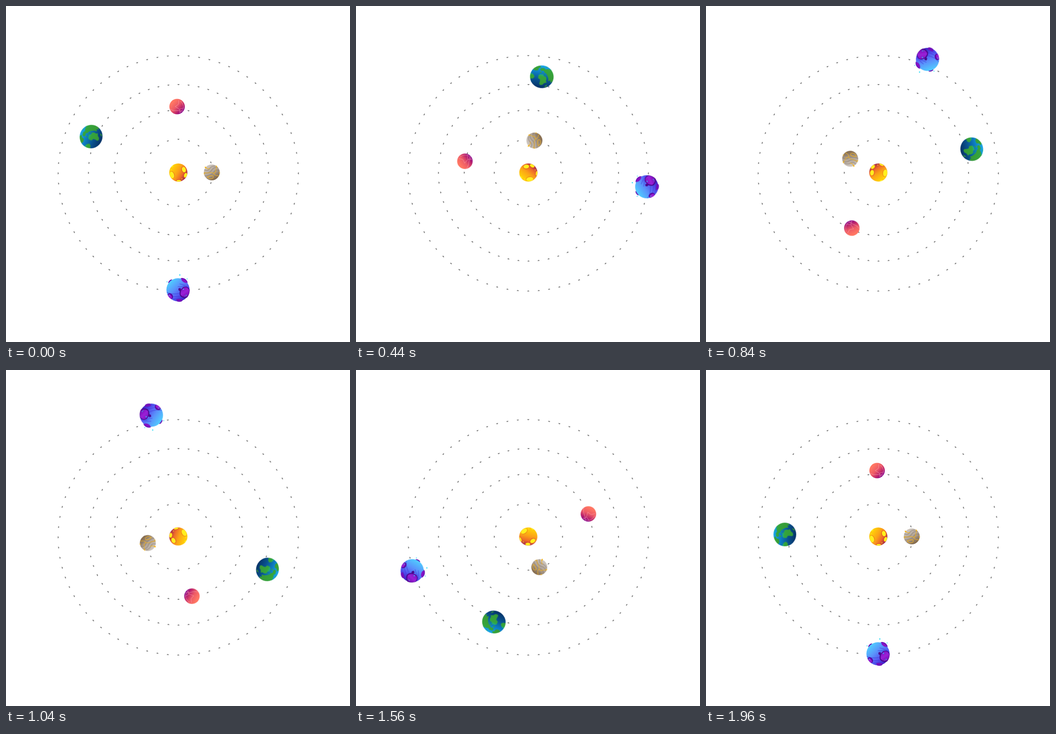
Write an HTML page that moves like this. It is 756 by 740 pixels and loops after 2000 ms.

```html
<!DOCTYPE html>
<html lang="en">
<head>
<meta charset="utf-8">
<title>Orbiting planets</title>
<style>
  html, body { margin: 0; width: 100%; height: 100%; overflow: hidden; background: #fff; }
  svg { display: block; width: 756px; height: 740px; }
  .orbit { animation: spin 2s infinite; transform-origin: var(--c); }
  /* 49 even steps of 40 ms, then a rest at the end pose */
  @keyframes spin {
    0% { transform: rotate(var(--from, 0deg)); animation-timing-function: steps(49); }
    97.99% { transform: rotate(var(--to, -361.5deg)); }
    98%, 100% { transform: rotate(var(--end, -360deg)); }
  }
  .sun { --c: 378.7px 366.7px; }
  .stone { --c: 381.2px 366.5px; }
  .coral { --c: 378px 361.5px; }
  .earth { --c: 381.3px 362.2px; --from: 21deg; --to: 361.6deg; --end: 360deg; }
  .violet { --c: 376px 359.2px; }
  .line { fill: none; stroke-linecap: round; stroke-linejoin: round; }
</style>
</head>
<body>
<svg viewBox="0 0 756 740">
  <defs>
    <linearGradient id="sunFill" x1=".1" y1=".25" x2=".95" y2=".75">
      <stop offset=".1" stop-color="#ffca0a"/><stop offset=".45" stop-color="#fba018"/>
      <stop offset=".72" stop-color="#ee6a2a"/><stop offset="1" stop-color="#98204c"/>
    </linearGradient>
    <linearGradient id="stoneFill" x1=".2" y1=".1" x2=".75" y2=".95">
      <stop offset="0" stop-color="#cfc8c2"/><stop offset=".5" stop-color="#b3a597"/>
      <stop offset="1" stop-color="#806443"/>
    </linearGradient>
    <linearGradient id="coralFill" x1=".15" y1=".15" x2=".9" y2=".85">
      <stop offset=".1" stop-color="#ff7663"/><stop offset=".45" stop-color="#ec5a66"/>
      <stop offset=".75" stop-color="#b8206c"/><stop offset="1" stop-color="#7c0496"/>
    </linearGradient>
    <linearGradient id="seaFill" x1=".22" y1=".02" x2=".68" y2=".98">
      <stop offset="0" stop-color="#22b4f4"/><stop offset=".35" stop-color="#0d80c6"/>
      <stop offset=".65" stop-color="#09528f"/><stop offset="1" stop-color="#042c60"/>
    </linearGradient>
    <linearGradient id="landFill" x1=".1" y1="0" x2=".6" y2="1">
      <stop offset="0" stop-color="#12b0a8"/><stop offset=".3" stop-color="#35a53c"/>
      <stop offset="1" stop-color="#379a35"/>
    </linearGradient>
    <linearGradient id="violetFill" x1=".12" y1=".12" x2=".85" y2=".9">
      <stop offset="0" stop-color="#4fd4ff"/><stop offset=".4" stop-color="#5a92fb"/>
      <stop offset=".68" stop-color="#5456f0"/><stop offset="1" stop-color="#3c14bc"/>
    </linearGradient>
    <linearGradient id="craterFill" x1=".2" y1="0" x2=".8" y2="1">
      <stop offset="0" stop-color="#7e12c4"/><stop offset=".5" stop-color="#9a20d6"/>
      <stop offset="1" stop-color="#7408b4"/>
    </linearGradient>
    <clipPath id="sunClip"><circle r="20"/></clipPath>
    <clipPath id="stoneClip"><circle r="17.5"/></clipPath>
    <clipPath id="coralClip"><circle r="17"/></clipPath>
    <clipPath id="violetClip"><circle r="25.5"/></clipPath>
    <clipPath id="earthClip"><ellipse rx="25" ry="26"/></clipPath>
  </defs>

  <g id="rings" fill="#808080"></g>

  <g class="orbit sun"><g transform="translate(378.7 366.7)">
    <circle r="20" fill="url(#sunFill)"/>
    <g clip-path="url(#sunClip)">
      <g fill="#d8442c" opacity=".75">
        <ellipse cx="-13.4" cy="5" rx="5.4" ry="8.3" transform="rotate(-18 -13.4 5)" opacity=".5"/>
        <ellipse cx="11.8" cy="-6.2" rx="5.2" ry="7" transform="rotate(-18 11.8 -6.2)"/>
        <ellipse cx="15.4" cy="6" rx="4" ry="6.3" transform="rotate(18 15.4 6)"/>
        <ellipse cx="1" cy="17.6" rx="6" ry="2.6"/>
      </g>
      <g fill="#fff01e">
        <ellipse cx="-14" cy="5.4" rx="4.6" ry="7.5" transform="rotate(-18 -14 5.4)"/>
        <ellipse cx="12.2" cy="-6.4" rx="4.3" ry="6.2" transform="rotate(-18 12.2 -6.4)"/>
        <ellipse cx="15.8" cy="6" rx="3.2" ry="5.3" transform="rotate(18 15.8 6)"/>
        <ellipse cx="1" cy="18.2" rx="5" ry="2"/>
        <ellipse cx="-13" cy="-13.6" rx="3" ry="1.3" transform="rotate(-45 -13 -13.6)"/>
        <circle cx="-16" cy="-6" r="1"/><circle cx="8" cy="14" r="1"/>
      </g>
    </g>
  </g></g>

  <g class="orbit stone"><g transform="translate(452.2 366.5)">
    <circle r="17.5" fill="url(#stoneFill)"/>
    <g class="line" clip-path="url(#stoneClip)">
      <g stroke="#85786c" stroke-width="2.6" opacity=".4">
        <path d="M-17 -6Q-9 -2 -5 -8T6 -14"/><path d="M-17 1Q-5 3 0 -5T15 -11"/>
        <path d="M-16 8Q-2 8 4 0T18 -4"/><path d="M-10 13Q5 12 10 5T18 3"/>
      </g>
      <g stroke="#eeb022" stroke-width="1.1">
        <path d="M-17 0Q-11 2 -6 .5T4 2L9 -2"/><path d="M-13 -11Q-9 -6 -4 -9M4 2L7 6L16 8"/>
        <path d="M-10 10Q-4 6 3 8Q5 13 -2 14Q-8 14 -10 10M9 -2Q8 -8 12 -13"/>
      </g>
    </g>
    <g fill="#f5b51d">
      <ellipse cx="-13.5" cy="-10.8" rx="2.4" ry="1.5" transform="rotate(40 -13.5 -10.8)"/>
      <circle cx="10" cy="-13.5" r="1.5"/><circle cx="17" cy="1" r="1.2"/><circle cx="-16.4" cy="3" r="1.2"/>
    </g>
  </g></g>

  <g class="orbit coral"><g transform="translate(376 221.5)">
    <circle r="17" fill="url(#coralFill)"/>
    <g class="line" clip-path="url(#coralClip)" stroke="#ffb0bd" stroke-width=".8" opacity=".75">
      <path d="M-17 5Q-9 10 0 9T16 12M-4 0L3 -5L4 -14M-4 0L5 6L7 14"/>
      <path d="M8 -12Q15 -4 14 3T5 13M5 6L14 3"/>
    </g>
  </g></g>

  <g class="orbit earth"><g transform="translate(173.2 362.2)">
    <g clip-path="url(#earthClip)"><g transform="rotate(-62.8)">
      <circle r="27" fill="url(#seaFill)"/>
      <g fill="url(#landFill)">
        <path d="M-12 -15L-7 -19L-2 -18L2 -22L8 -25L15 -23L22 -16L26 -5L23 0L20 -4L17 0L14 -5L10 -8L5 -11L0 -11L-4 -13L-8 -10L-12 -11Z"/>
        <path d="M-8 1L-6 -3L-1 -6L4 -4L8 -5L11 -2L13 3L16 4L12 9L11 14L7 17L4 16L2 10L0 7L-5 7Z"/>
        <path d="M-25 6L-18 6L-13 9L-14 14L-18 17L-20 24L-27 18Z"/>
        <path d="M-25 -11L-18 -18L-13 -17L-16 -12L-15 -7L-20 -3L-26 -3Z"/>
        <path d="M18 10L20 8L20 13L17 16ZM-8 -24L0 -26L-2 -23Z"/>
        <path d="M-9 -8L-6 -9L-6 -6L-9 -5ZM-2 -9L0 -9L1 -7L-1 -7ZM4 -9L7 -7L5 -6Z"/>
      </g>
    </g></g>
  </g></g>

  <g class="orbit violet"><g transform="translate(378 625)">
    <g fill="#6508b0">
      <ellipse cx="13" cy="-19.5" rx="9" ry="5" transform="rotate(34 13 -19.5)"/>
      <ellipse cx="3" cy="23" rx="7" ry="3.5"/>
      <ellipse cx="-17" cy="-18.5" rx="5.5" ry="2.5" transform="rotate(-42 -17 -18.5)"/>
    </g>
    <circle r="25.5" fill="url(#violetFill)"/>
    <g clip-path="url(#violetClip)">
      <g class="line" stroke="#3f36d8" stroke-width="1.6" opacity=".5">
        <path d="M-24 6Q-12 11 2 8"/><path d="M-20 12Q-8 17 5 14"/><path d="M-14 19Q-3 21 8 19"/>
        <path d="M4 -13Q14 -11 22 -6"/><path d="M0 -7Q8 -6 14 -8"/>
      </g>
      <ellipse cx="-17" cy="14" rx="5.5" ry="7" transform="rotate(-38 -17 14)" fill="#5808a4"/>
      <ellipse cx="-18" cy="15" rx="3.8" ry="5.4" transform="rotate(-38 -18 15)" fill="#9a1ed2"/>
    </g>
    <ellipse cx="13.4" cy="-19.8" rx="7" ry="3" transform="rotate(34 13.4 -19.8)" fill="#8412c4"/>
    <path d="M-4 21Q3 19 10 21L8 25Q3 27 -2 25Z" fill="#7210bc"/>
    <path d="M1 -3L5 -4L7 -1Q11 -8 18 -7Q24 -5 25.5 0Q26 10 20 17Q13 20 6 15Q2 10 4 3L1 1Z" fill="#4a0890"/>
    <path d="M8 0Q12 -6 18 -5.5Q24 -3 25 2Q25 11 19 15Q11 17 6 11Q5 5 8 0Z" fill="url(#craterFill)"/>
    <g fill="#22d8f4">
      <circle cx="4" cy="-32.6" r="1.3"/><circle cx="20" cy="-24" r="1"/><circle cx="-24" cy="-17.5" r="1.1"/>
      <circle cx="18" cy="12" r="1"/><circle cx="12" cy="-1" r="1.2"/><circle cx="-19" cy="12" r="1"/>
      <circle cx="15" cy="14" r=".8"/>
    </g>
  </g></g>
</svg>
<script>
  // Each ring: centre x and y, radius x and y, number of marks
  const rings = [
    [378.6, 368.5, 264, 259.2, 72],
    [379.1, 367.4, 197.9, 194.4, 56],
    [379, 367, 141.1, 138.1, 40],
    [378.9, 367.2, 75, 73.6, 20]
  ];
  let marks = '';
  for (const [cx, cy, rx, ry, n] of rings) {
    for (let i = 0; i < n; i++) {
      const turn = i / n, a = turn * 2 * Math.PI;
      const x = cx + rx * Math.sin(a), y = cy - ry * Math.cos(a);
      marks += `<path d="M-2.2 -1H2.2A2.2 2.3 0 0 1 -2.2 -1Z" transform="translate(${x.toFixed(2)} ${y.toFixed(2)}) rotate(${(turn * 360).toFixed(2)})"/>`;
    }
  }
  document.getElementById('rings').innerHTML = marks;
</script>
</body>
</html>
```
